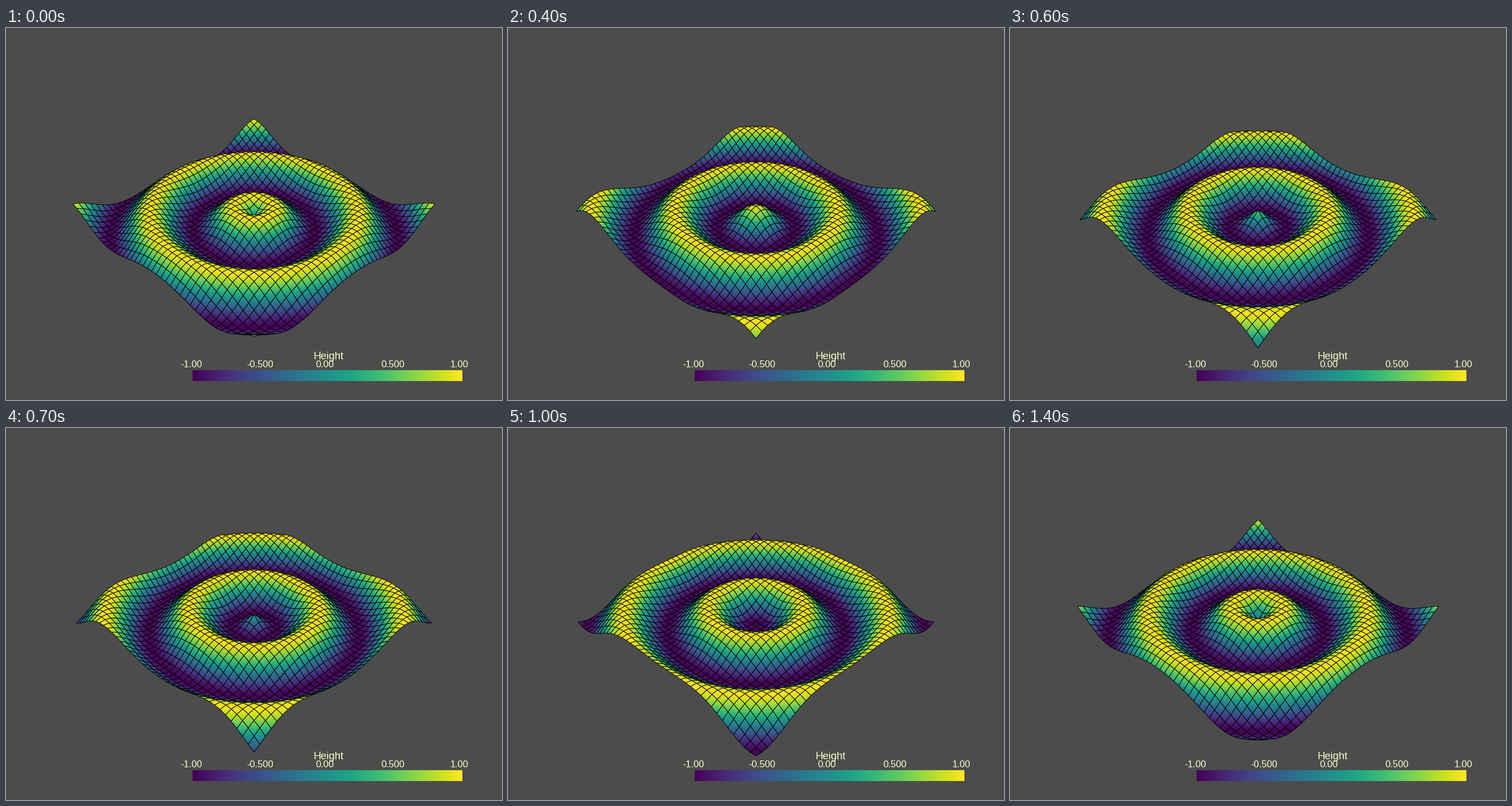
Write a matplotlib script that moves like this. It is 864 by 648 pixels and loops after 1.5 s.

```python
import matplotlib.pyplot as plt
import numpy as np
from matplotlib.animation import FuncAnimation
from matplotlib.collections import PolyCollection

W, H = 864, 648
FRAMES = 15
SUB = 4  # colour patches per cell side
TEXT = "#f4ffc8"

# Height field: a radial sine wave on a square grid
axis = np.arange(-10, 10, 0.5)
X, Y = np.meshgrid(axis, axis, indexing="ij")
R = np.hypot(X, Y)
N = len(axis)
CELLS = N - 1

# Isometric camera that fits the bounding sphere in a 30 degree view
Z0 = np.sin(R)
LOW = np.array([axis[0], axis[0], Z0.min()])
HIGH = np.array([axis[-1], axis[-1], Z0.max()])
CENTER = (LOW + HIGH) / 2
HALF_VIEW = np.radians(15)
DISTANCE = np.linalg.norm(HIGH - LOW) / 2 / np.sin(HALF_VIEW)
FOCAL = H / 2 / np.tan(HALF_VIEW)
RIGHT = np.array([-1, 1, 0]) / np.sqrt(2)
UP = np.array([-1, -1, 2]) / np.sqrt(6)
TOWARD = np.array([1, 1, 1]) / np.sqrt(3)

# Linear interpolation weights from the grid to the finer patches
steps = np.linspace(0, CELLS, CELLS * SUB + 1)
WEIGHTS = np.array([np.interp(steps, np.arange(N), row) for row in np.eye(N)])


def project(z):
    rel = np.stack([X, Y, z], axis=-1) - CENTER
    scale = FOCAL / (DISTANCE - rel @ TOWARD)
    return W / 2 + rel @ RIGHT * scale, H / 2 - rel @ UP * scale


def refine(a):
    return WEIGHTS.T @ a @ WEIGHTS


def corners(a):
    return np.stack([a[:-1, :-1], a[1:, :-1], a[1:, 1:], a[:-1, 1:]], axis=2)


def by_cell(a):
    """Group fine patches so that each coarse cell holds its own."""
    tail = a.shape[2:]
    a = a.reshape(CELLS, SUB, CELLS, SUB, *tail).swapaxes(1, 2)
    return a.reshape(CELLS * CELLS, SUB * SUB, *tail)


def with_outline(patches, outline):
    """Append the outline of each cell after its patches."""
    both = np.concatenate([patches, outline], axis=1)
    return both.reshape(-1, *both.shape[2:])


def surface(phase):
    """Polygons and colours from the farthest cell to the nearest."""
    z = np.sin(R + phase)
    px, py = project(z)
    points = np.stack([px, py], axis=-1)
    fine = np.stack([refine(px), refine(py)], axis=-1)
    cells = corners(points).reshape(-1, 1, 4, 2)
    verts = with_outline(by_cell(corners(fine)), cells)

    values = by_cell(corners(refine(z)).mean(axis=2))
    fill = plt.cm.viridis((values + 1) / 2)
    clear = np.zeros((len(cells), 1, 4))
    black = clear + [0, 0, 0, 1]
    return verts, with_outline(fill, clear), with_outline(fill, black)


fig = plt.figure(figsize=(W / 72, H / 72), dpi=72, facecolor="#4c4c4c")
ax = fig.add_axes([0, 0, 1, 1])

# Colour bar
ax.imshow(np.arange(256)[None], cmap="viridis", aspect="auto",
          extent=(325, 795, 615, 596), interpolation="nearest")
ax.set_xlim(0, W)
ax.set_ylim(H, 0)
ax.axis("off")


def label(x, y, text, size):
    ax.text(x, y, text, size=size, color=TEXT, family="Liberation Sans",
            ha="center", va="baseline", zorder=5)


label(561.5, 577.3, "Height", 18.2)
ticks = ["-1.00", "-0.500", "0.00", "0.500", "1.00"]
for x, text in zip([323, 442.5, 555.5, 674, 790], ticks):
    label(x, 591.3, text, 16.5)

mesh = PolyCollection([], linewidths=[0.5] * SUB**2 + [1], snap=False, zorder=3)
ax.add_collection(mesh, autolim=False)


def draw(frame):
    verts, faces, edges = surface(2 * np.pi * frame / FRAMES)
    mesh.set_verts(verts)
    mesh.set_facecolor(faces)
    mesh.set_edgecolor(edges)
    return [mesh]


anim = FuncAnimation(fig, draw, frames=FRAMES, interval=100,
                     init_func=lambda: draw(0), repeat=True, repeat_delay=0)
plt.show()
```
